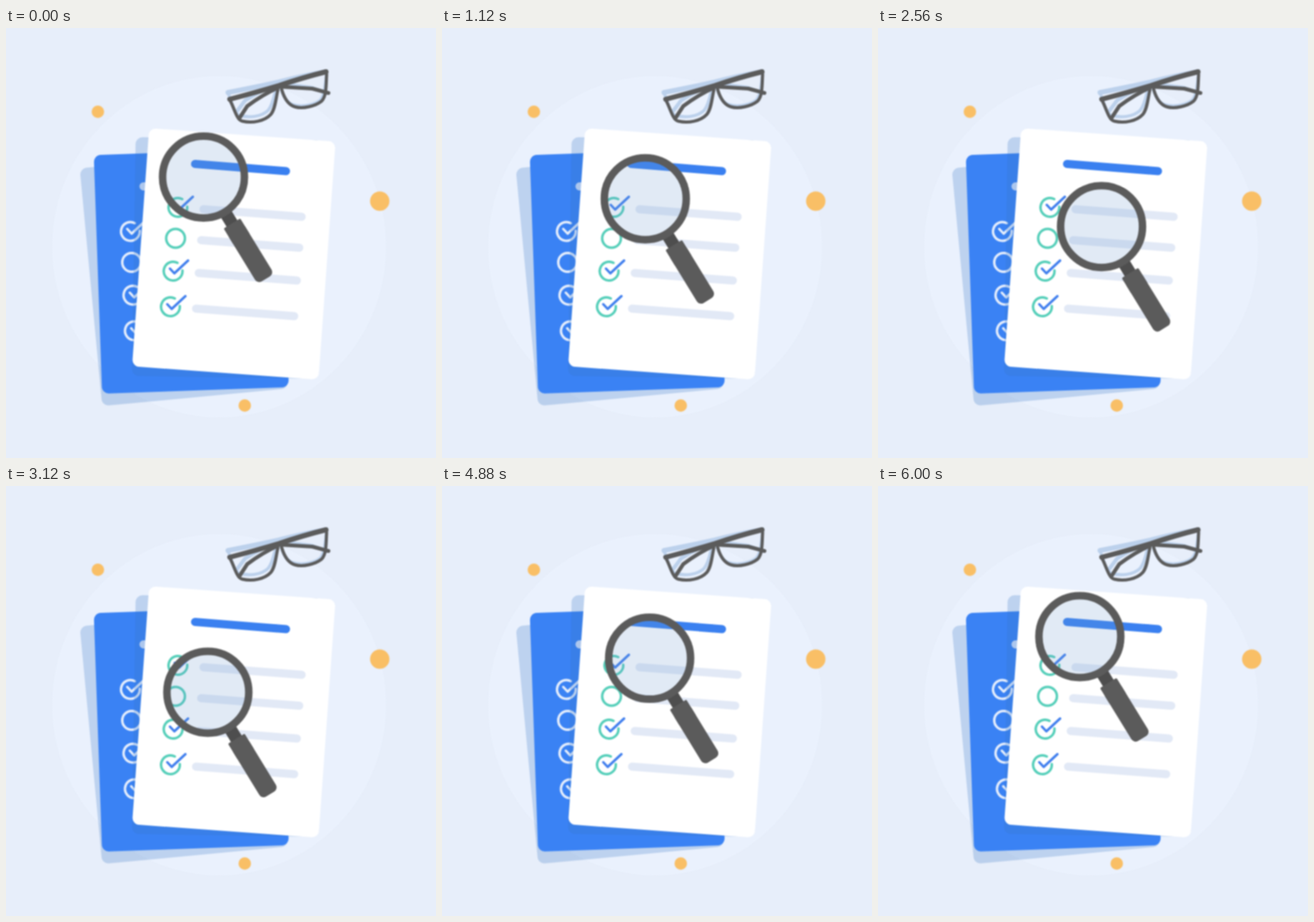
These frames come from a looping animation (688 px wide and 688 px high, 6080 ms). An HTML page:

```html
<!DOCTYPE html>
<html lang="en">
<head>
<meta charset="utf-8">
<title>Checklist review</title>
<style>
  html, body { margin: 0; height: 100%; overflow: hidden; background: #e7eefa; }
  svg { display: block; width: 100%; height: 100%; filter: blur(.8px); }
  .shade { fill: rgb(55 118 194 / .25); }
  .line { fill: none; stroke-linecap: round; stroke-linejoin: round; }
  .bar { stroke-width: 13; }
</style>
</head>
<body>
<svg viewBox="0 0 688 688">
  <defs>
    <rect id="sheet" x="-149.5" y="-191" width="299" height="382" rx="11"/>
    <path id="openRing" d="M15 -1A15 15 0 1 1 7 -13.3"/>
    <path id="tick" d="M-5 -4L2 3.5L24 -17"/>
    <g id="glasses" class="line">
      <path stroke-width="8" d="M358 114Q400 103 437 92Q476 79 512 70"/>
      <path stroke-width="5" d="M359 117C366 130 369 147 378 149C394 153 414 149 424 138C431 129 432 112 435 99M441 98C445 112 452 123 462 126C475 130 495 125 505 117C513 109 512 92 513 74"/>
      <path stroke-width="6" d="M373 145L386 125Q410 107 436 95M516 104L490 97L441 94"/>
    </g>
  </defs>

  <ellipse cx="341" cy="350" rx="267" ry="273" fill="#eaf1fd"/>
  <g fill="#f9bf66">
    <circle cx="147" cy="134" r="10"/>
    <circle cx="598" cy="277" r="15.5"/>
    <circle cx="382" cy="604" r="10"/>
  </g>

  <use href="#glasses" stroke="#bcd1ec" transform="rotate(4 512 70)"/>
  <use href="#glasses" stroke="#5b5b5b"/>

  <use href="#sheet" class="shade" transform="translate(284.8 400.6) rotate(-5.4)"/>
  <use href="#sheet" fill="#3a82f4" transform="translate(296.5 389) rotate(-2)"/>
  <path class="line bar" stroke="#d5e3fa" d="M220 253.5l40 -1.5"/>
  <g id="backRows" class="line" stroke="#e4edfc" stroke-width="4"></g>

  <use href="#sheet" class="shade" transform="translate(354 368) rotate(.9)"/>
  <use href="#sheet" fill="#fff" transform="translate(364.5 361.5) rotate(4.1)"/>
  <path class="line bar" stroke="#3a80f0" d="M302.5 217.5l145.500 11.500"/>
  <g id="frontRows" class="line" stroke="#56cfba" stroke-width="4"></g>

  <g id="glass">
    <circle r="65.5" fill="rgb(105 150 205 / .2)"/>
    <g transform="rotate(58.5)" fill="#5b5b5b">
      <rect x="68" y="-10" width="24" height="20" fill="#4e4e4e"/>
      <rect x="87" y="-15.5" width="30" height="31" rx="2"/>
      <rect x="95" y="-15.5" width="96" height="31" rx="8"/>
    </g>
    <circle r="65.5" fill="none" stroke="#5b5b5b" stroke-width="12"/>
  </g>
</svg>
<script>
  const STEP = 80, HALF = 3040, SWEEPS = 3;
  const $ = id => document.getElementById(id);

  // Four rows down a tilted sheet; the second is left unchecked.
  const rowOffsets = [0, 49.5, 102, 159];
  function addRows(id, x, y, lean, tickColor, extra = '') {
    $(id).innerHTML = rowOffsets.map((dy, i) => {
      const mark = i === 1
        ? '<circle r="15"/>'
        : `<use href="#openRing"/><use href="#tick" stroke="${tickColor}"/>`;
      return `<g transform="translate(${x + lean * dy} ${y + dy})">${mark}${extra}</g>`;
    }).join('');
  }
  addRows('backRows', 199, 325.5, .04, '#e4edfc');
  addRows('frontRows', 275, 287, -.075, '#4280ee', '<path class="bar" stroke="#e2e9f6" d="M41 3l157 12"/>');

  const glass = $('glass');
  const start = performance.now();

  // The lens sweeps sideways while sinking, then retraces its way back up.
  function draw(now) {
    const elapsed = Math.max(0, now - start) % (2 * HALF);
    const t = Math.floor(elapsed / STEP) * STEP;
    const p = 1 - Math.abs(t / HALF - 1);
    const sweep = 1 - Math.abs(2 * (p * SWEEPS % 1) - 1);
    glass.setAttribute('transform', `translate(${316 + 44 * sweep} ${238.5 + 94 * p})`);
    requestAnimationFrame(draw);
  }
  draw(start);
</script>
</body>
</html>
```
